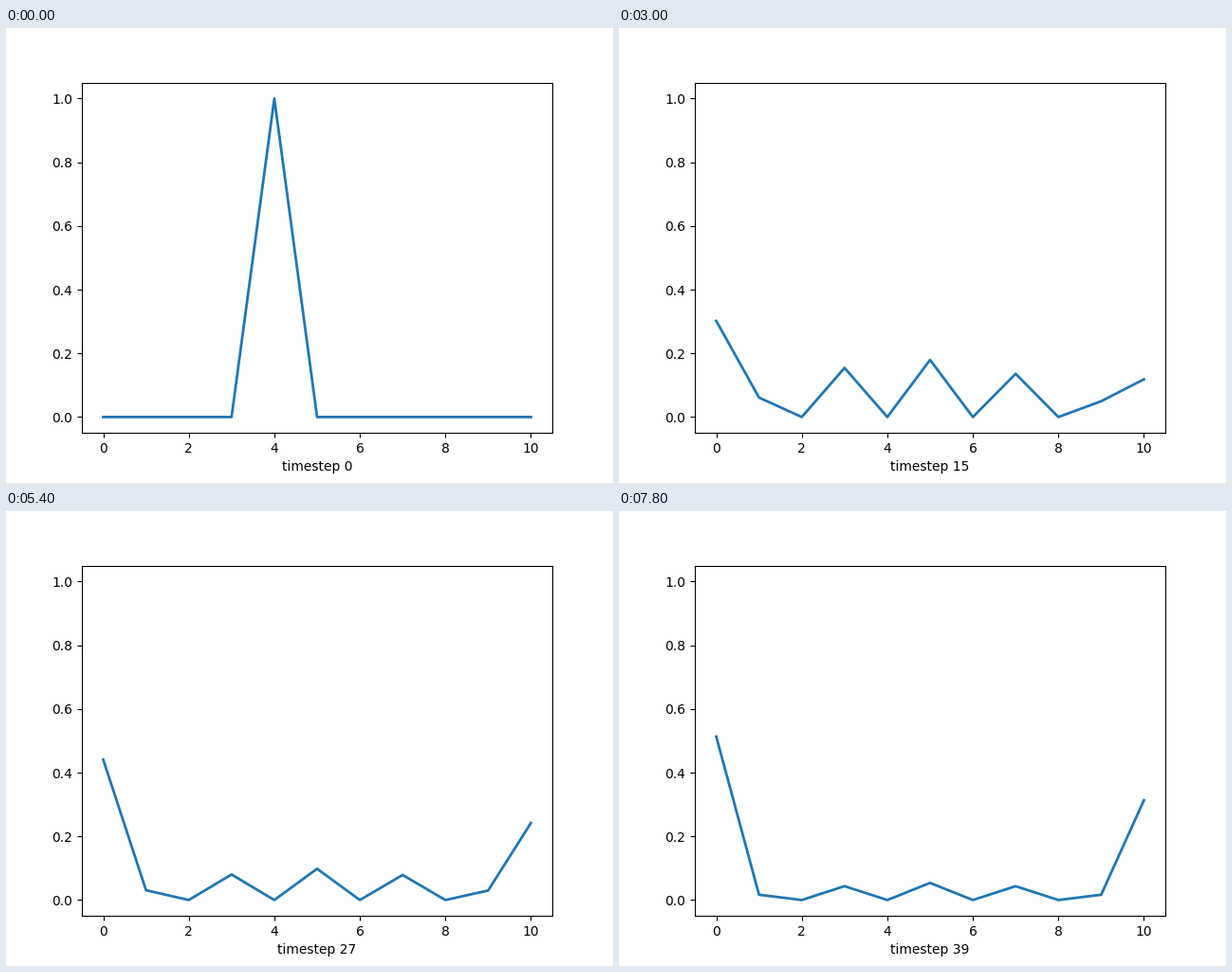
A matplotlib script that plays this animation: 640 by 480 pixels, repeating every 8 s.

```python
import numpy as np
import matplotlib.pyplot as plt
from matplotlib.animation import FuncAnimation

STATES = 11
START = 4
STEPS = 40
INTERVAL = 200  # ms


def walk_matrix(n):
    """Fair random walk on n states with absorbing ends."""
    m = np.zeros((n, n))
    m[0, 0] = m[-1, -1] = 1
    for i in range(1, n - 1):
        m[i, i - 1] = m[i, i + 1] = 0.5
    return m


def distributions():
    m = walk_matrix(STATES)
    p = np.eye(STATES)[START]
    rows = []
    for _ in range(STEPS):
        rows.append(p)
        p = p @ m
    return rows


probs = distributions()

fig, ax = plt.subplots(figsize=(6.4, 4.8), dpi=100)
line, = ax.plot(np.arange(STATES), probs[0], lw=2)
ax.set_xlim(-0.5, 10.5)
ax.set_ylim(-0.05, 1.05)
label = ax.set_xlabel("timestep 0")


def update(step):
    line.set_ydata(probs[step])
    label.set_text(f"timestep {step}")
    return line, label


anim = FuncAnimation(fig, update, frames=STEPS, interval=INTERVAL,
                     repeat=True, repeat_delay=0)
plt.show()
```
